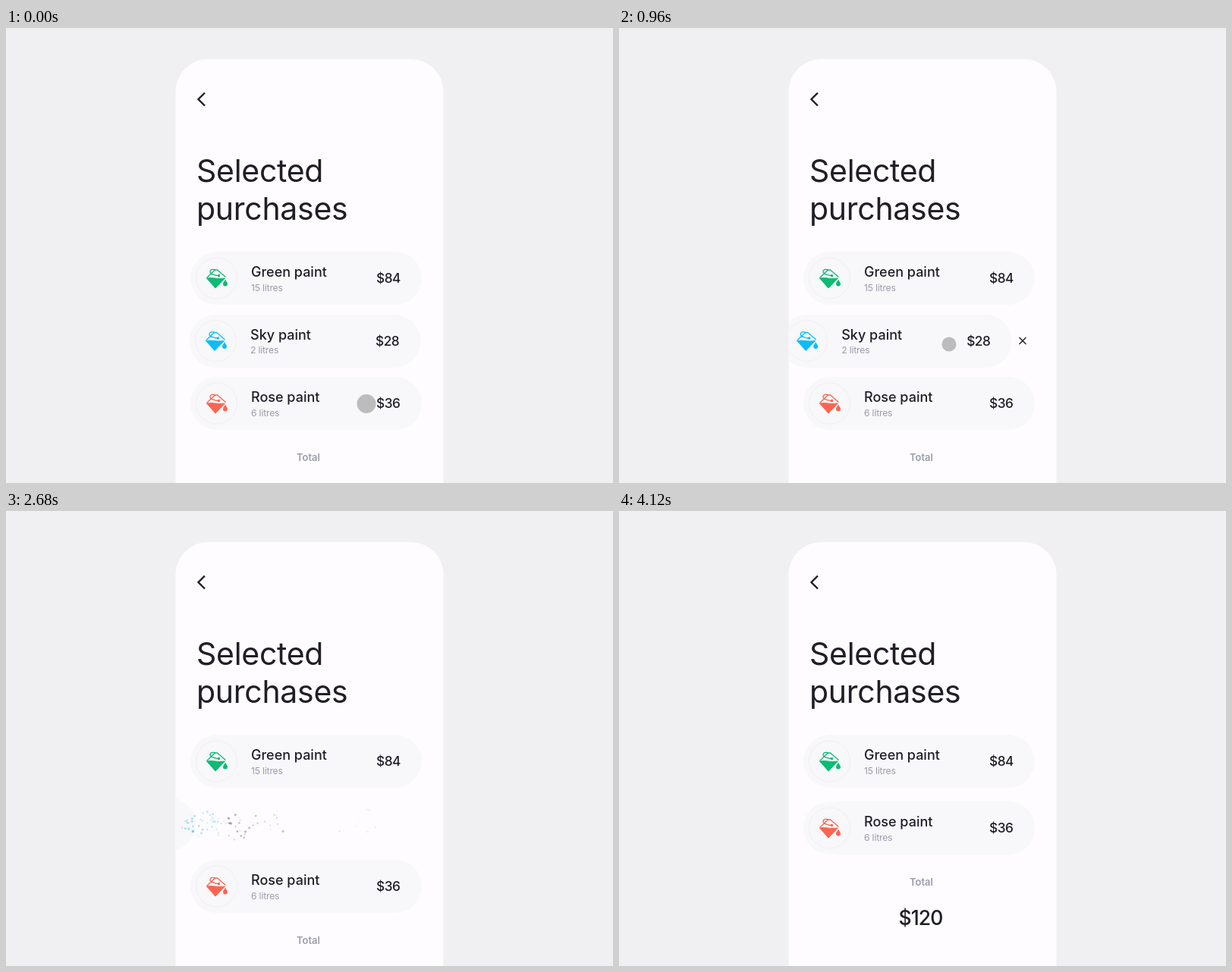
Recreate the animation shown at these times as an HTML page. Size 800 px wide and 600 px high, loop 4.24 s.

```html
<!DOCTYPE html>
<html lang="en">
<head>
<meta charset="utf-8">
<title>Selected purchases</title>
<style>
html, body { margin: 0; width: 100%; height: 100%; overflow: hidden; background: #f0eff1; }
svg { display: block; width: 800px; height: 600px; }
text { font-family: Inter, "Open Sans", sans-serif; fill: #201f26; }
.head { font-size: 41px; letter-spacing: -.007em; }
.name { font-size: 18px; font-weight: 500; }
.size { font-size: 12.2px; letter-spacing: -.015em; fill: #9a9cac; }
.price { font-size: 17.3px; font-weight: 500; letter-spacing: -.03em; }
.label { font-size: 13px; font-weight: 600; fill: #9a9cac; text-anchor: middle; }
.sum { font-size: 26.5px; font-weight: 500; letter-spacing: -.035em; text-anchor: middle; }
.pill { fill: #f8f7f9; }
.ring { fill: none; stroke: #f0eff2; }
.line { fill: none; stroke: #201f26; stroke-width: 1.4; }
</style>
</head>
<body>
<svg viewBox="0 0 800 600">
  <defs>
    <clipPath id="card"><rect x="223.5" y="41" width="353" height="660" rx="43"/></clipPath>
    <linearGradient id="fade" gradientUnits="userSpaceOnUse">
      <stop stop-color="#fff"/><stop offset="1" stop-color="#000"/>
    </linearGradient>
    <mask id="wipe" maskUnits="userSpaceOnUse" x="0" y="0" width="800" height="600">
      <rect width="800" height="600" fill="url(#fade)"/>
    </mask>
    <g id="bucket">
      <path fill="currentColor" stroke="currentColor" stroke-linejoin="round"
        d="M-13-.5Q-7-1.500-2-.5T11-.5L-1.500 12.500Z"/>
      <path fill="currentColor" d="M11.5 1C13 4 14.5 5 14.5 7A3 3 0 0 1 8.5 7C8.5 5 10 4 11.5 1Z"/>
      <path fill="none" stroke="currentColor" stroke-width="1.3" stroke-linejoin="round"
        d="M-13-1L-2-11.500 1-11.500 12-2M3-4C-2-4-9-6.500-8.500-9.500C-8-13-3-12.500-1-11"/>
      <circle cx="3" cy="-4" r="1.7" fill="currentColor"/>
    </g>
  </defs>
  <g clip-path="url(#card)">
    <rect width="800" height="600" fill="#fefcff"/>
    <path class="line" style="stroke-width:2.4" d="M262 85.500L253.500 94 262 102.500"/>
    <text class="head" x="251" y="203">Selected</text>
    <text class="head" x="251" y="253">purchases</text>
    <g id="green" transform="translate(0 330)"></g>
    <rect id="skyPill" class="pill" y="378" height="70" rx="35"/>
    <g mask="url(#wipe)"><g id="sky"></g></g>
    <g id="lower">
      <g id="rose" transform="translate(0 495)"></g>
      <text class="label" x="398.500" y="570.500">Total</text>
      <text class="sum" id="sum" x="397.500" y="623"></text>
    </g>
    <g id="dust"></g>
    <line class="line" id="armA"/>
    <line class="line" id="armB"/>
    <circle id="touch"/>
  </g>
</svg>
<script>
const LOOP = 4240, FRAME = 40;
const $ = id => document.getElementById(id);
const set = (el, attrs) => { for (const k in attrs) el.setAttribute(k, attrs[k]); };
const mix = (a, b, p) => a + (b - a) * p;
const span = (t, start, length) => Math.min(1, Math.max(0, (t - start) / length));
const ease = (u, n = 3) => u < .5 ? (2 * u) ** n / 2 : 1 - (2 - 2 * u) ** n / 2;
const move = (t, a, b, start, length, n) => mix(a, b, ease(span(t, start, length), n));

const content = (color, name, size, price) => `
  <circle class="ring" cx="277.5" r="27"/>
  <use href="#bucket" x="277.5" y=".5" style="color:${color}"/>
  <text class="name" x="323" y="-2">${name}</text>
  <text class="size" x="323" y="16.5">${size}</text>
  <text class="price" x="488" y="6.3">${price}</text>`;
const pill = '<rect class="pill" x="243" y="-35" width="305" height="70" rx="35"/>';
$('green').innerHTML = pill + content('#0dbb74', 'Green paint', '15 litres', '$84');
$('rose').innerHTML = pill + content('#fa6552', 'Rose paint', '6 litres', '$36');
$('sky').innerHTML = content('#0cbcf9', 'Sky paint', '2 litres', '$28');

// Dust released from the price, the labels and the icon
let seed = 11;
const rnd = (a, b) => {
  seed = seed * 16807 % 2147483647;
  return mix(a, b, seed / 2147483647);
};
const dust = [];
function scatter(count, x0, x1, y0, y1, color) {
  for (let i = 0; i < count; i++) {
    const el = document.createElementNS('http://www.w3.org/2000/svg', 'circle');
    const x = rnd(x0, x1);
    set(el, { fill: color, r: rnd(.8, 1.7) });
    $('dust').append(el);
    dust.push({ el, x, y: rnd(y0, y1), dx: rnd(-24, 12), dy: rnd(-15, 13),
      born: 1900 + (500 - x) * 2.1 + rnd(-20, 40), life: rnd(350, 950) });
  }
}
scatter(18, 450, 484, 404, 418, '#55545b');
scatter(40, 293, 374, 402, 426, '#3a3940');
scatter(38, 233, 288, 402, 424, '#2fbfe9');

function arm(el, angle, half) {
  const x = half * Math.cos(angle), y = half * Math.sin(angle);
  set(el, { x1: 532 - x, y1: 412.5 - y, x2: 532 + x, y2: 412.5 + y, opacity: half > 0 ? 1 : 0 });
}

function drawCross(t) {
  if (t < 1800) {
    const flat = 1 - ease(span(t, 1700, 80));
    const tilt = move(t, .92, Math.PI / 4, 640, 240) * flat;
    arm($('armA'), tilt, 6.3 * span(t, 590, 90));
    arm($('armB'), -tilt, 6.3 * span(t, 740, 140));
    return;
  }
  // The flattened cross stretches into a stroke that sweeps left
  set($('armA'), {
    x1: move(t, 526, 223, 1780, 780), x2: move(t, 538, 223, 1840, 780),
    y1: 412.4, y2: 412.4, opacity: t < 2620 ? 1 : 0
  });
  set($('armB'), { opacity: 0 });
}

function draw(t) {
  const shift = move(t, -1, -31, 20, 1200);
  set($('sky'), { transform: `translate(${shift} 412.5)` });
  const right = t < 1890 ? 547.5 + shift : move(t, 516.5, 222, 1890, 1010, 2);
  const left = Math.min(242.5 + shift, right - 70);
  set($('skyPill'), { x: left, width: right - left });

  const front = move(t, 560, 150, 1780, 880, 2);
  set($('fade'), { x1: front - 42, x2: front + 28, y1: 0, y2: 0 });

  const k = Math.max(0, t - 2700) * .013;
  set($('lower'), { transform: `translate(0 ${-77 * (1 - (1 + k) * Math.exp(-k))})` });
  $('sum').textContent = t < 2700 ? '$148' : '$120';

  set($('touch'), {
    cx: move(t, 475, 435, 0, 900) + move(t, 0, 95, 1420, 220),
    cy: move(t, 495.5, 417, 0, 500) - move(t, 0, 4, 1420, 220),
    r: move(t, 12.5, 9.5, 0, 400) - move(t, 0, 2.5, 1600, 80),
    opacity: .24 * (1 - span(t, 1660, 120))
  });

  drawCross(t);

  for (const d of dust) {
    const age = (t - d.born) / d.life;
    const drift = 1 - (1 - Math.min(1, Math.max(0, age))) ** 2;
    set(d.el, {
      cx: d.x + d.dx * drift, cy: d.y + d.dy * drift,
      opacity: age > 0 && age < 1 ? .75 * (1 - age) ** 1.3 : 0
    });
  }
}

const origin = performance.now();
function tick() {
  const t = (performance.now() - origin) % LOOP;
  draw(Math.floor(t / FRAME) * FRAME);
  requestAnimationFrame(tick);
}
tick();
</script>
</body>
</html>
```
